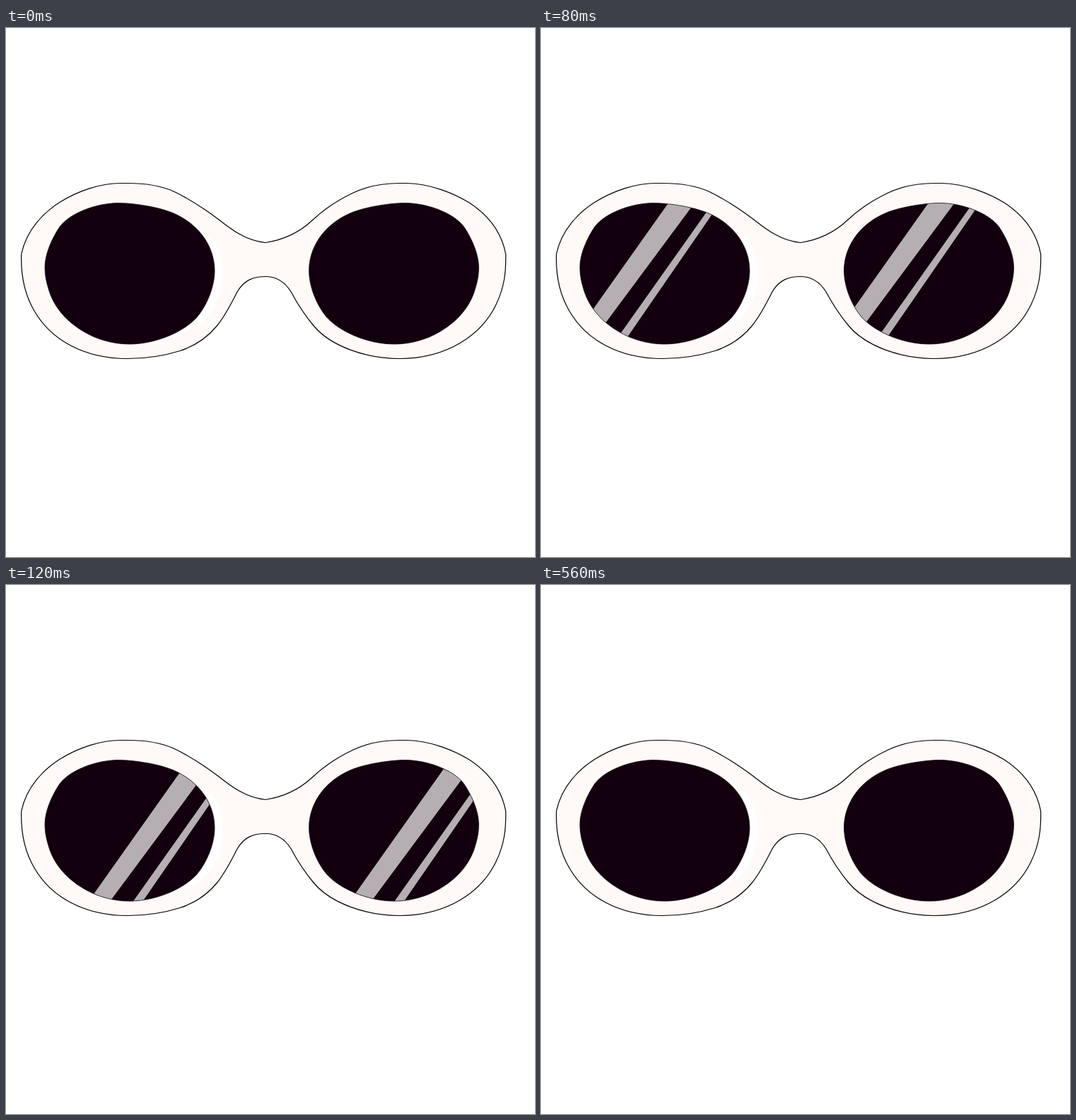
Write an HTML page that moves like this. It is 748 px wide and 748 px high and loops after 0.8 s.

```html
<!DOCTYPE html>
<html lang="en">
<head>
<meta charset="utf-8">
<title>Sunglasses</title>
<style>
  html, body { margin: 0; width: 100%; height: 100%; overflow: hidden; background: #fff; }
  svg { display: block; width: 100%; height: 100%; }
</style>
</head>
<body>
<svg viewBox="0 0 748 748">
  <defs>
    <path id="lens" d="M157 247.5C175 247 213 252 236 261.5C277 279 295 313 295 343
      C295 365 285 391 270 409C252 429 213 447 174 447C151 447 128 440 111 430
      C92 419 72 402 62 375C57 360 55 350 55 338C55 320 65 297 76 281C92 260 130 248 157 247.5Z"/>
    <use id="mirrored" href="#lens" transform="matrix(-1 0 0 1 723.5 0)"/>
    <clipPath id="leftClip"><use href="#lens"/></clipPath>
    <clipPath id="rightClip"><use href="#lens" transform="matrix(-1 0 0 1 723.5 0)"/></clipPath>
    <path id="glare" fill="#b5afb3" d="M192.5 230H230L59.4 460H29.5ZM255.5 230H265L106.3 460H92.6Z"/>
  </defs>
  <path fill="#fffaf8" stroke="#000" stroke-width="1.2" d="M21.7 320C29 284 55 260 75 247C103 229.5 135 219.5 162 219.5H172
    C197 219.5 219 223 237 231C260 242 281 256 300 270.2C320 286 340 301 367 303.5
    C396 299 418 286 433 272C452 254 472 242 491 233C514 222 538 219.5 557 219.5H567
    C600 220 634 234 655 247C678 262 700 284 706.7 320C707 345 705 366 693 391
    C673 433 625 467.5 556 467.5C510 467 460 451 435 421C424 408 411 388 403 373
    C393 357 380 351.5 367 351.5C350 351.5 337 356 327 373C320 387 310 407 298 421.5
    C286 436 269 449 246 456.5C222 464 195 467.5 172 467.5C109 467.5 63 440 40 400C24 373 21 345 21.7 320Z"/>
  <path fill="#fff" d="M288 292C305 312 308 340 306 358C302 395 280 425 232 438Z"/>
  <g fill="#13000e">
    <use href="#lens"/>
    <use href="#mirrored"/>
  </g>
  <g clip-path="url(#leftClip)"><use id="leftGlare" href="#glare"/></g>
  <g clip-path="url(#rightClip)"><use id="rightGlare" href="#glare"/></g>
  <g fill="none" stroke="#13000e" stroke-width=".7">
    <use href="#lens"/>
    <use href="#mirrored"/>
  </g>
</svg>
<script>
  const LOOP = 800, STEP = 40, LAST = 5;
  const left = document.getElementById('leftGlare');
  const right = document.getElementById('rightGlare');
  const start = performance.now();

  // The glare sweeps across in 40 ms steps, then rests outside the lenses.
  function draw(now) {
    const time = Math.max(0, now - start) % LOOP;
    const step = Math.min(LAST, Math.floor(time / STEP)) - 2;
    left.setAttribute('x', 78.2 * step);
    right.setAttribute('x', 367.7 + 80 * step);
    requestAnimationFrame(draw);
  }
  draw(start);
</script>
</body>
</html>
```
